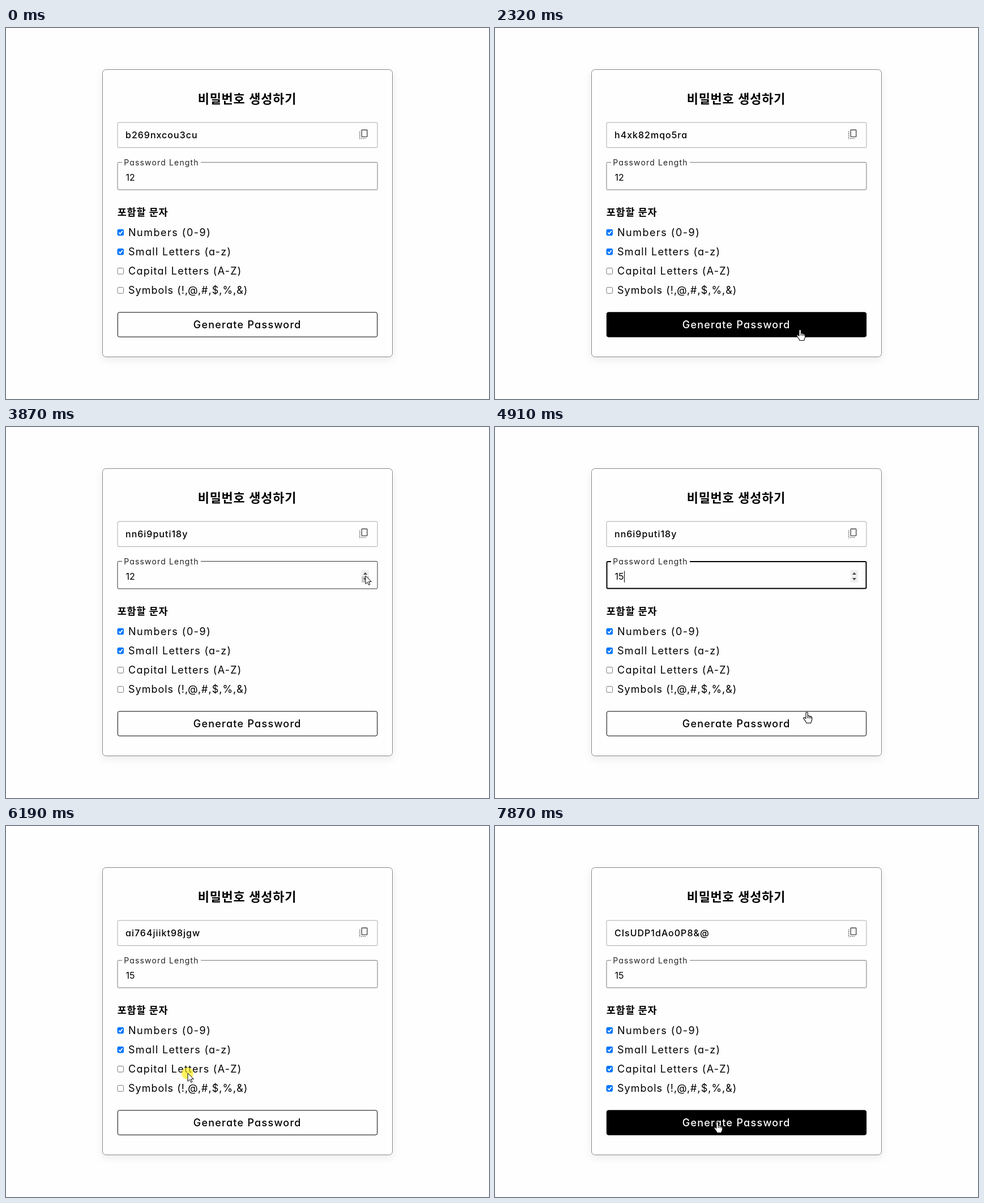
Animation, 853 px wide and 656 px high, one loop 8000 ms. Source, as an HTML page:

```html
<!DOCTYPE html>
<html lang="ko">
<head>
<meta charset="utf-8">
<title>비밀번호 생성하기</title>
<style>
html, body { margin: 0; width: 100%; height: 100%; overflow: hidden; background: #fefefe; }
svg { display: block; width: 100%; height: 100%; }
text { font-family: Inter, "Open Sans", sans-serif; font-feature-settings: "cv11"; fill: #000; white-space: pre; }
.ko { font-family: "Noto Sans CJK KR", "Noto Sans CJK", sans-serif; font-weight: 700; letter-spacing: .7px; }
.card { fill: #fefefe; stroke: #888; filter: drop-shadow(0 5px 7px rgba(0,0,0,.07)); }
#label { font-size: 14px; letter-spacing: 1.15px; fill: #222; }
#password { font-size: 16px; font-weight: 500; letter-spacing: 1px; }
#length { font-size: 16px; }
#options { font-size: 18px; }
#buttonText { font-size: 18px; font-weight: 500; letter-spacing: 1.25px; }
</style>
</head>
<body>
<svg viewBox="0 0 853 656">
  <rect class="card" x="170.5" y="73.5" width="512" height="508" rx="6"/>
  <text class="ko" x="338.7" y="133" font-size="22">비밀번호 생성하기</text>

  <rect x="197" y="167" width="459" height="44.5" rx="2" fill="none" stroke="#aaa"/>
  <text id="password" x="211" y="195"></text>
  <g fill="none" stroke="#4a4a4a" stroke-width="1.4">
    <rect x="628.2" y="180.2" width="9.6" height="12.2" rx=".6"/>
    <path d="M624.7 183V196.5M627 195.4H635" stroke-dasharray="1.6 1.5"/>
  </g>

  <path id="field" fill="none"/>
  <text id="label" x="208.3" y="242.7">Password Length</text>
  <text id="length" x="211.5" y="270"></text>
  <path id="caret" d="M228.5 254.5V275" stroke="#000"/>
  <g id="spinner">
    <rect x="628" y="253" width="13" height="22" fill="#efefef"/>
    <rect id="half" x="628" width="13" height="11" fill="#c9c9c9"/>
    <path d="M631 261L634.5 257L638 261ZM631 267L634.5 271L638 267Z" fill="#444"/>
  </g>

  <text class="ko" x="196.8" y="331.5" font-size="17.5">포함할 문자</text>
  <g id="options"></g>

  <rect id="button" x="197.3" y="502.8" width="458.4" height="43.4" rx="3" stroke="#000"/>
  <text id="buttonText" x="330.7" y="530.5">Generate Password</text>

  <g id="pointer">
    <circle id="halo" cx="-.5" cy=".5" r="10.5" fill="#ffec00" opacity=".62"/>
    <g fill="#fff" stroke="#000" stroke-linejoin="round">
      <path id="arrow" d="M0 0V14.5L3.4 11.3 5.6 16.3 7.9 15.3 5.7 10.4H10.4Z"/>
      <path id="hand" stroke-width="1.1" d="M-2 11.5V2a1.7 1.7 0 0 1 3.4 0V7c1-.9 2.6-.5 2.8.6 1-.7 2.4-.2 2.6.9 1.1-.4 2 .2 2 1.4V13c0 3-2 4-2 6.5H-1C-1 17-5 14-6 11.3c-.5-1.4 1.3-2.2 2.2-1.2ZM1.4 7v4M4.2 7.6v3.6M6.8 8.5v3"/>
    </g>
  </g>
</svg>
<script>
const LOOP = 8000;
const STEP = 70;    // ms between pointer positions
const PRESS = 110;  // ms the mouse button stays down
const $ = id => document.getElementById(id);
const show = (id, on) => $(id).setAttribute('visibility', on ? 'visible' : 'hidden');

const passwords = [
  'b269nxcou3cu', 'h4xk82mqo5ra', 'nn6i9puti18y', 't83kqe5vm0zjy2c',
  'ai764jiikt98jgw', 'R4&kZm#9Lq!e7Tb', 'w$G2pX%5uNh@3Jd', 'CIsUDP1dAo0P8&@'
];
const options = [
  { label: 'Numbers (0-9)', gap: 1.5 },
  { label: 'Small Letters (a-z)', gap: 1.3 },
  { label: 'Capital Letters (A-Z)', gap: 1.25 },
  { label: 'Symbols (!,@,#,$,%,&amp;)', gap: 1 }
];
// press times by what is clicked
const clicks = {
  generate: [1800, 2530, 5070, 5590, 7160, 7600, 7760],
  longer: [4080, 4220, 4360],
  capitals: [6190],
  symbols: [6710]
};
const start = { x: 900, y: 700 };
// each move eases from where the last one ended: time, steps, x, y
const moves = [
  [1240, 6, 565, 537],
  [2180, 3, 539, 533],
  [2660, 5, 515, 518],
  [3200, 1, 512, 511],
  [3260, 7, 633, 324],
  [3720, 4, 635, 259],
  [4500, 6, 560, 482],
  [4910, 1, 551, 504],
  [4980, 2, 533, 520],
  [5720, 7, 321, 437],
  [6390, 2, 322, 460],
  [6860, 4, 383, 536],
  [7130, 1, 393, 523]
];

const easeOut = u => 1 - (1 - u) ** 2;
const released = (what, t) => clicks[what].filter(c => t >= c + PRESS).length;
const pressed = (what, t) => clicks[what].filter(c => t >= c).length;

function pointerAt(t) {
  let { x, y } = start;
  for (const [from, steps, toX, toY] of moves) {
    if (t < from) break;
    const k = Math.min(steps, 1 + Math.floor((t - from) / STEP + .2));
    const u = easeOut(k / steps);
    x += (toX - x) * u;
    y += (toY - y) * u;
  }
  return { x, y };
}

const inside = (p, top, bottom) => p.x > 196 && p.x < 657 && p.y > top && p.y < bottom;
const overButton = p => inside(p, 502, 547);

function fieldPath(inset) {
  const l = 197 + inset, r = 656 - inset, top = 237.5 + inset, bottom = 286 - inset;
  return `M205 ${top}H${l + 2}q-2 0-2 2V${bottom - 2}q0 2 2 2H${r - 2}q2 0 2-2V${top + 2}q0-2-2-2H344`;
}

$('options').innerHTML = options.map(({ label, gap }, i) => `
  <g transform="translate(197 ${356.2 + i * 34.15})">
    <rect id="box${i}" width="10.6" height="10.6" rx="2"/>
    <path id="tick${i}" d="M2.3 5.4l2.3 2.5 4.2-5.2" fill="none" stroke="#fff" stroke-width="1.8"/>
    <text x="19" y="11.4" letter-spacing="${gap}">${label}</text>
  </g>`).join('');

function drawField(t, p) {
  const focused = t >= clicks.longer[0] && t < clicks.generate[2];
  const hovered = inside(p, 237, 287);
  const field = $('field');
  field.setAttribute('d', fieldPath(focused ? .5 : 0));
  field.setAttribute('stroke', focused ? '#000' : hovered ? '#333' : '#777');
  field.setAttribute('stroke-width', focused ? 2 : 1);
  $('length').textContent = 12 + pressed('longer', t);
  show('caret', focused);
  show('spinner', focused || hovered);
  show('half', hovered && p.x > 627 && p.x < 642 && p.y < 276);
  $('half').setAttribute('y', p.y < 262 ? 253 : 264);
}

function drawOptions(t) {
  const checked = [true, true, released('capitals', t) > 0, released('symbols', t) > 0];
  checked.forEach((on, i) => {
    $('box' + i).setAttribute('fill', on ? '#0075ff' : '#fff');
    $('box' + i).setAttribute('stroke', on ? '#0075ff' : '#767676');
    show('tick' + i, on);
  });
}

function drawPointer(t, p) {
  const hand = overButton(p);
  show('arrow', !hand);
  show('hand', hand);
  show('halo', Object.values(clicks).flat().some(c => t >= c && t < c + PRESS));
  $('pointer').setAttribute('transform', `translate(${p.x} ${p.y})`);
}

function draw(t) {
  const p = pointerAt(t);
  const dark = overButton(pointerAt(t - 60));  // hover colour lags a little
  $('password').textContent = passwords[released('generate', t)];
  $('button').setAttribute('fill', dark ? '#000' : '#fefefe');
  $('buttonText').style.fill = dark ? '#fff' : '#000';
  drawField(t, p);
  drawOptions(t);
  drawPointer(t, p);
}

function frame() {
  draw(performance.now() % LOOP);
  requestAnimationFrame(frame);
}
frame();
</script>
</body>
</html>
```
